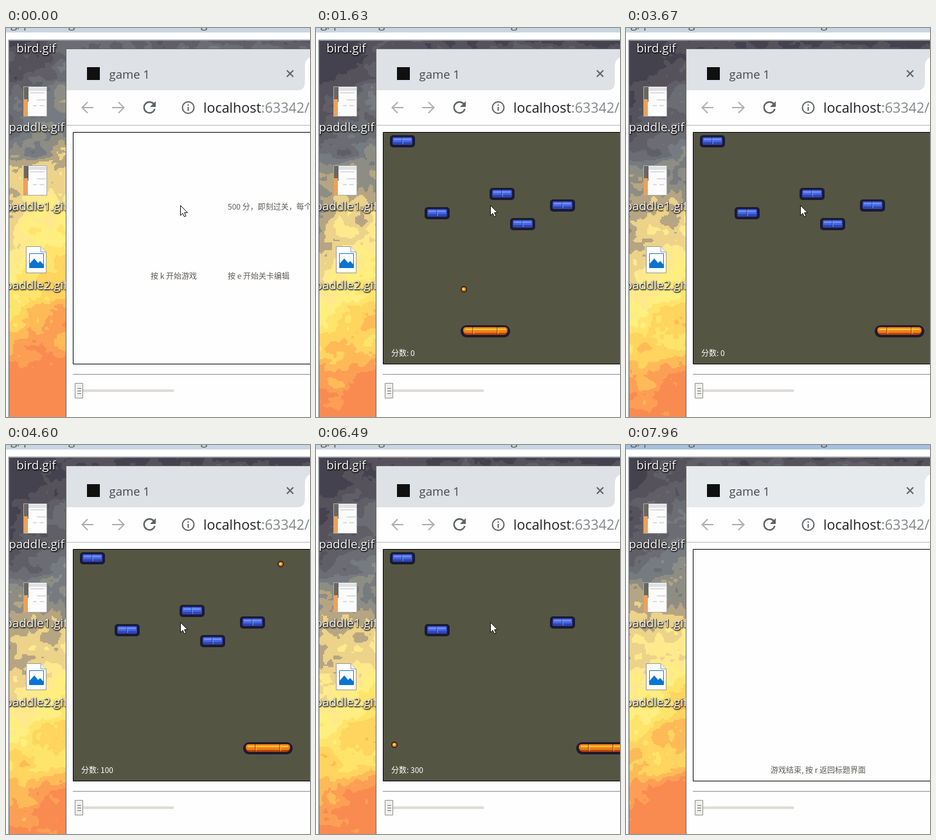
These frames come from a looping animation (473x606 px, 8050 ms). An HTML page with a canvas:

```html
<!DOCTYPE html>
<html lang="zh">
<head>
<meta charset="utf-8">
<title>game 1</title>
<style>
  html, body { margin: 0; width: 100%; height: 100%; overflow: hidden; background: #fff; }
  canvas, svg { position: absolute; left: 0; top: 0; }
  text { font-family: "Open Sans", "Noto Sans", sans-serif; white-space: pre; }
  .label { font-size: 18.8px; fill: #fff; text-anchor: middle; text-shadow: 1px 1px 2px #000, 0 1px 2px #000; }
  .small { font: 12px "Noto Sans CJK SC", "Noto Sans CJK", sans-serif; fill: #5c5a55; }
  .icon { fill: none; stroke: #5f6368; stroke-width: 2; }
</style>
</head>
<body>
<canvas id="sky" width="473" height="606"></canvas>
<svg width="473" height="606" viewBox="0 0 473 606">
  <defs>
    <clipPath id="desktop"><path d="M5 20H94V606H5Z"/></clipPath>
    <clipPath id="board"><path d="M105 163H473V523H105Z"/></clipPath>
    <g id="block">
      <rect width="39" height="19" rx="5" fill="#1b1a30"/>
      <rect x="4" y="3" width="31" height="12" rx="2" fill="#2f45b4"/>
      <path d="M5 4H34V11H5Z" fill="#4565df"/>
      <path d="M6 6.5H33" stroke="#7799fa" stroke-width="2"/>
      <path d="M19 3V15" stroke="#1f2a78"/>
      <path d="M20 4V14" stroke="#7f9cf5"/>
    </g>
    <g id="thumb">
      <rect x="27.5" width="36" height="46" y=".5" fill="#fcfcfc" stroke="#aaa"/>
      <path d="M28 1H35V24H28Z" fill="#6b665f"/>
      <path d="M28 20H34V46H28Z" fill="#efa058"/>
      <path d="M35 2H63V7H35Z" fill="#dfe1e5"/>
      <path d="M38 10H60M48 21H62M42 30H48M52 30H59" stroke="#bbb"/>
    </g>
  </defs>

  <rect id="bar" width="473" height="7"/>
  <g font-size="19" fill="#555"><text x="7" y="0">g, p</text><text x="97" y="0">g</text><text x="303" y="0">g</text></g>
  <path d="M0 7H473V18H0ZM0 18H4V606H0Z" fill="#fff"/>
  <path d="M4.5 606V19H473" fill="none" stroke="#777b80" stroke-width="1.5"/>

  <g clip-path="url(#desktop)">
    <use href="#thumb" y="91"/>
    <use href="#thumb" y="214"/>
    <path d="M31.5 340.5H54L62.5 349V381.5H31.5Z" fill="#fff" stroke="#999"/>
    <path d="M54 340.5V349H62.5" fill="#eee" stroke="#999"/>
    <path d="M36.5 351.5H58.5V373.5H36.5Z" fill="#fff" stroke="#1677d2"/>
    <path d="M37 373V367L44 359L50 366L53 363L58 368V373Z" fill="#0b74d1"/>
    <text class="label" x="47" y="38">bird.gif</text>
    <text class="label" x="47.5" y="161">paddle.gif</text>
    <text class="label" x="47" y="284">paddle1.gif</text>
    <text class="label" x="47" y="407">paddle2.gif</text>
  </g>

  <path d="M94 33H473V606H94Z" fill="#fefefe"/>
  <path id="tabs" d="M94 33H473V46Q465 49 465 60V85Q465 97 453 97H94Z"/>
  <path d="M93.5 606V32.5H473" fill="none" stroke="#6b6660"/>
  <rect x="126" y="61" width="20" height="20" fill="#101010"/>
  <text x="160.500" y="79" font-size="18.5" fill="#45494d">game 1</text>
  <path class="icon" d="M437 66L447 76M447 66L437 76" stroke="#333"/>
  <path class="icon" d="M136 124H119M127 115.500L118.500 124L127 132.500M165 124H183M175 115.500L183.500 124L175 132.500" style="stroke:#adafb1"/>
  <path class="icon" d="M230 118.500A8.500 8.500 0 1 0 231.500 126" style="stroke-width:2.400"/>
  <path d="M233 114V123H224Z" fill="#5f6368"/>
  <circle class="icon" cx="283.500" cy="124" r="9"/>
  <path class="icon" d="M283.500 119V121M283.500 123V129"/>
  <text x="307" y="132" font-size="21.5" fill="#202124">localhost<tspan fill="#80868b">:63342/</tspan></text>
  <path d="M94 151.500H473" stroke="#b9b9b9"/>

  <g clip-path="url(#board)">
    <g id="title" class="small">
      <text class="small" x="345" y="283">500 分，即刻过关，每个砖块 100 分</text>
      <text class="small" x="225" y="391">按 k 开始游戏</text>
      <text class="small" x="345" y="391">按 e 开始关卡编辑</text>
    </g>
    <g id="play">
      <path d="M105 163H473V523H105Z" fill="#555544"/>
      <use href="#block" x="115" y="167"/>
      <use href="#block" x="169" y="279"/>
      <use href="#block" x="364" y="267"/>
      <use href="#block" id="lower" x="302" y="296"/>
      <use href="#block" id="upper" x="270" y="249"/>
      <g id="paddle">
        <rect width="77" height="19" rx="9" fill="#211a2b"/>
        <rect x="4" y="3" width="69" height="12" rx="6" fill="#b9440f"/>
        <rect x="4" y="3" width="69" height="9" rx="4.500" fill="#ed8115"/>
        <path d="M7 6.500H70" stroke="#ffd13c" stroke-width="2"/>
        <path d="M19 3V16M57 3V16" stroke="#5b230f"/>
        <path d="M20 4V14M58 4V14" stroke="#ffc75a"/>
      </g>
      <g id="ball">
        <circle r="5" fill="#33201c"/>
        <circle r="3.300" fill="#e88b18"/>
        <circle cx="-.5" cy="-.5" r="1.600" fill="#ffe07a"/>
      </g>
      <text id="score" class="small" x="117" y="511" style="fill:#fff"></text>
    </g>
    <text id="over" class="small" x="225" y="511">游戏结束, 按 r 返回标题界面</text>
  </g>
  <path d="M473 162.500H104.500V523.500H473" fill="none" stroke="#000"/>
  <path id="cursor" d="M271.500 276.500V292L275 288.700L277.500 294L280 293L277.600 287.700H282.500Z" fill="#fff" stroke="#111"/>

  <path d="M104 539.500H473" stroke="#8c8c8c"/>
  <path d="M107 565H261" stroke="#dedcd6" stroke-width="4"/>
  <path d="M107.500 553.500H119.500V576.500H107.500Z" fill="#f0f0ee" stroke="#8f8f8b"/>
  <path d="M111 561.500H117M111 565.500H117M111 569.500H117" stroke="#777"/>
</svg>
<script>
const LOOP = 8050, START = 900, OVER = 6610, BLUR = 7810;
const $ = id => document.getElementById(id);
const sky = $('sky').getContext('2d');

const marks = [0, 120, 1120, 1240, 1630, 2200, 2320, 2830, 3250, 3400, 4300, 4450,
  4600, 5290, 5440, 5560, 6490, 6610, 7540, 7660, 7960, LOOP];
const ticks = marks.slice(0, -1).flatMap((from, i) => {
  const span = marks[i + 1] - from, count = Math.round(span / 135);
  return Array.from({ length: count }, (_, k) => from + span * k / count);
});

// Rows of [time, ...values]: one row per bounce or change of direction.
const ballPath = [[1630, 230, 407], [1930, 284, 461], [3591, 583, 162], [3663, 596, 175],
  [4030, 530, 241], [4469, 451, 162], [5236, 313, 300], [5393, 284, 269],
  [6390, 104, 449], [6490, 122, 467]];
const paddlePath = [[1800, 225], [2700, 387], [4450, 387], [4550, 369], [4700, 369], [4900, 405]];
const skyLift = [[0, 60], [1630, 0], [5290, -25], [6490, -10], [7960, 15]];
const hits = [4030, 5236, 5393];

function along(path, t) {
  const next = path.findIndex(row => row[0] > t);
  if (next < 1) return path.at(next).slice(1);
  const a = path[next - 1], b = path[next], f = (t - a[0]) / (b[0] - a[0]);
  return a.slice(1).map((v, i) => v + (b[i + 1] - v) * f);
}

function hash(x, y) {
  const v = Math.sin(x * 127.1 + y * 311.7) * 43758.5453;
  return v - Math.floor(v);
}

function noise(x, y) {
  const i = Math.floor(x), j = Math.floor(y);
  const ease = f => f * f * (3 - 2 * f), mix = (a, b, f) => a + (b - a) * f;
  const u = ease(x - i), v = ease(y - j);
  return mix(mix(hash(i, j), hash(i + 1, j), u), mix(hash(i, j + 1), hash(i + 1, j + 1), u), v) - .5;
}

const tones = ['#45424f', '#55525c', '#605e66', '#6b6d73', '#757b80', '#8d8d84', '#b5a582', '#ecd389',
  '#ffe98c', '#ffee80', '#ffe46c', '#ffd45f', '#ffba58', '#fc9f55', '#f98b50'];

function drawSky(t) {
  const [lift] = along(skyLift, t), drift = t / 9000;
  for (let y = 20; y < 606; y += 2) {
    const right = y < 33 ? 473 : 94;
    for (let x = 5; x < right; x += 2) {
      const cloud = 110 * noise(x / 45 + drift, y / 38) + 65 * noise(x / 17 - drift, y / 15)
        + 35 * noise(x / 7, y / 6);
      const level = Math.floor((y - 20 + lift + cloud + (Math.min(x, 94) - 48) * .5) / 39);
      sky.fillStyle = tones[Math.max(0, Math.min(tones.length - 1, level))];
      sky.fillRect(x, y, 2, 2);
    }
  }
}

const show = (id, on) => $(id).style.display = on ? '' : 'none';
const place = (id, x, y) => $(id).setAttribute('transform', `translate(${x} ${y})`);

function draw(t) {
  drawSky(t);
  show('title', t < START);
  show('play', t >= START && t < OVER);
  show('over', t >= OVER);
  show('cursor', t < OVER);
  show('lower', t < hits[1]);
  show('upper', t < hits[2]);
  place('ball', ...along(ballPath, t));
  place('paddle', ...along(paddlePath, t), 463);
  $('score').textContent = '分数: ' + 100 * hits.filter(h => h <= t).length;
  $('bar').setAttribute('fill', t < BLUR ? '#c9d6e2' : '#a6c0df');
  $('tabs').setAttribute('fill', t < BLUR ? '#dee1e6' : '#e7eaed');
}

let shown;
function frame() {
  const now = performance.now() % LOOP;
  const tick = ticks.findLast(t => t <= now);
  if (tick !== shown) draw(shown = tick);
  requestAnimationFrame(frame);
}
frame();
</script>
</body>
</html>
```
